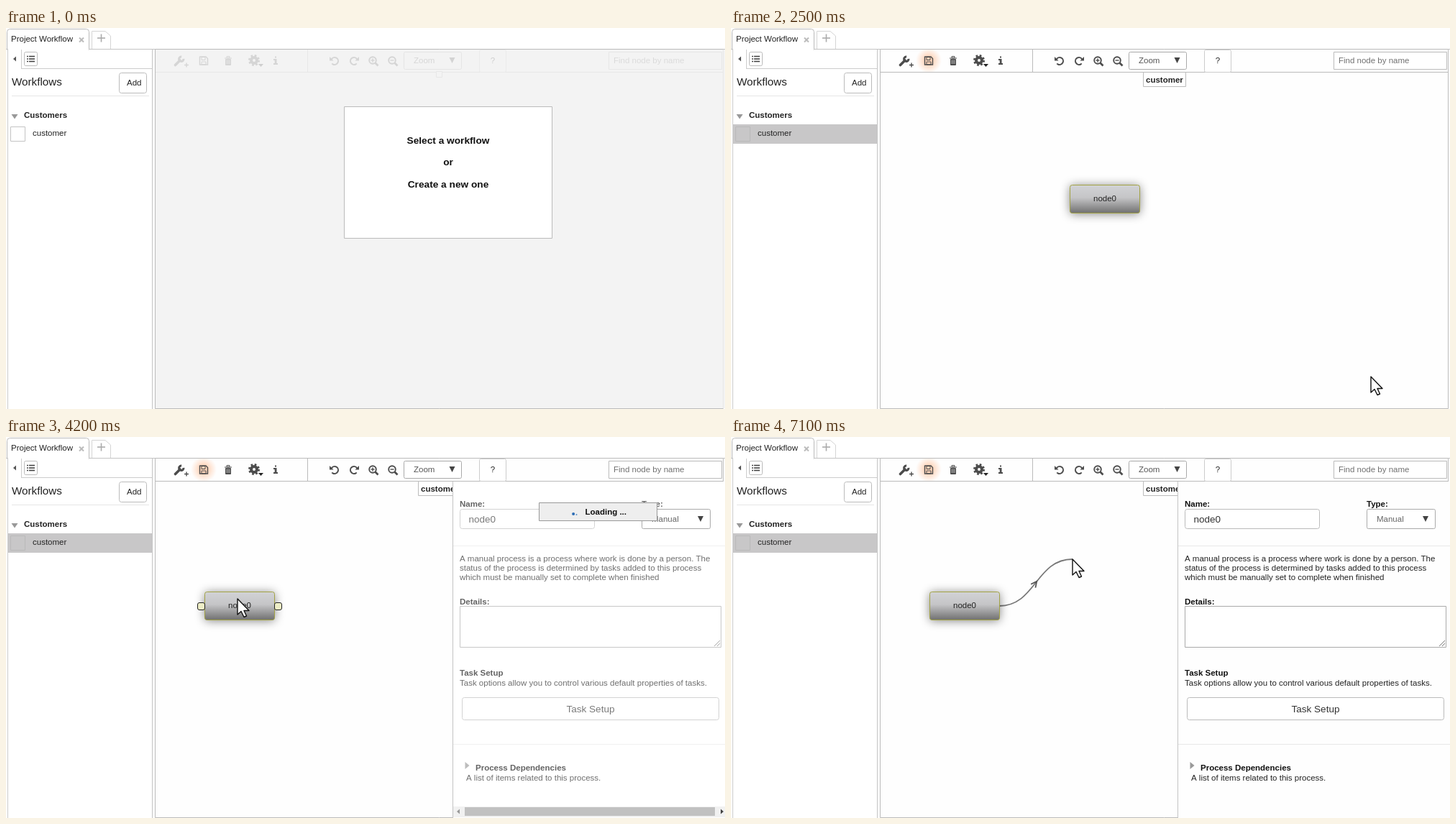
These frames come from a looping animation (1000x530 px, 7200 ms). An HTML page with a canvas:

```html
<!DOCTYPE html>
<html lang="en">
<head>
<meta charset="utf-8">
<title>Workflow editor</title>
<style>
html, body { margin: 0; width: 100%; height: 100%; overflow: hidden; background: #fff; }
canvas { display: block; width: 1000px; height: 530px; }
</style>
</head>
<body>
<canvas id="stage" width="1000" height="530"></canvas>
<script>
const c = document.getElementById('stage').getContext('2d');
const LOOP = 7200, STEP = 100, INK = '#4c4c4c';

// Cursor positions: time, x, y
const CURSOR_KEYS = [
  [100, 648, 360], [800, 117, 153], [1700, 117, 153], [2000, 890, 485],
  [2500, 890, 485], [2800, 520, 240], [3200, 517, 228], [3300, 517, 228],
  [3900, 322, 225], [4900, 322, 225], [5200, 390, 237], [6000, 390, 237], [6500, 475, 170]
];
const HAND = new Path2D('M-2 17V1.5Q0-1.5 2 1.5V9Q5 7 6.5 10Q9 8 10.5 11Q13 9.5 13.5 13V20L11 25V29H-2V26L-10 17Q-9 12-5 15Z');
const ARROW = new Path2D('M0 0V22L5 17.5L9 25.5L12.5 24L9 16.5H16Z');

function text(s, x, y, { size = 11.5, bold = false, color = '#222', align = 'left' } = {}) {
  c.font = `${bold ? 'bold ' : ''}${size}px "Liberation Sans", Arial, sans-serif`;
  c.fillStyle = color;
  c.textAlign = align;
  c.fillText(s, x, y);
}
function rect(x, y, w, h, fill, stroke, r = 0) {
  c.beginPath();
  c.roundRect(x + .5, y + .5, w, h, r);
  if (fill) { c.fillStyle = fill; c.fill(); }
  if (stroke) { c.strokeStyle = stroke; c.lineWidth = 1; c.stroke(); }
}
function line(points, color = '#bbb', width = 1) {
  c.beginPath();
  points.forEach(([x, y]) => c.lineTo(x, y));
  c.strokeStyle = color;
  c.lineWidth = width;
  c.stroke();
}
const hline = (x1, x2, y, color) => line([[x1, y + .5], [x2, y + .5]], color);
const vline = (x, y1, y2, color) => line([[x + .5, y1], [x + .5, y2]], color);
function poly(points, color) {
  c.beginPath();
  points.forEach(([x, y]) => c.lineTo(x, y));
  c.fillStyle = color;
  c.fill();
}
function circle(x, y, r, color) {
  c.beginPath();
  c.arc(x, y, r, 0, 7);
  c.fillStyle = color;
  c.fill();
}
function arc(x, y, r, from, to, width) {
  c.beginPath();
  c.arc(x, y, r, from, to);
  c.strokeStyle = INK;
  c.lineWidth = width;
  c.stroke();
}
function at(x, y, draw, sx = 1, sy = sx) {
  c.save();
  c.translate(x, y);
  c.scale(sx, sy);
  draw();
  c.restore();
}
const down = (x, y, color = '#444') => poly([[x - 4, y - 3], [x + 4, y - 3], [x, y + 5]], color);

function wrench() {
  c.lineCap = 'round';
  line([[-5.5, 5.5], [1, -1]], INK, 3.6);
  c.lineCap = 'butt';
  arc(2.8, -2.8, 3.2, -.1, -1.47, 3);
}
function save() {
  line([[-5.5, -5.5], [3, -5.5], [5.5, -3], [5.5, 5.5], [-5.5, 5.5], [-5.5, -6]], INK, 1.4);
  rect(-3.5, -5.5, 5, 4, null, INK);
  rect(-3.5, 1, 6, 4, null, INK);
}
function trash() {
  rect(-5.5, -4.5, 10, 1, INK);
  rect(-2.5, -6.5, 4, 2, null, INK);
  rect(-4.5, -3, 8, 9, INK, null, 1);
  for (const x of [-2, 0, 2]) line([[x, -1], [x, 4.5]], '#ccc', .8);
}
function gear() {
  arc(0, 0, 4, 0, 7, 4);
  c.setLineDash([2.55, 2.55]);
  arc(0, 0, 6.5, 0, 6.28, 3);
  c.setLineDash([]);
}
function info() {
  rect(-1.5, -6, 2, 2, INK);
  poly([[-3, -2], [1.5, -2], [1.5, 4], [3, 4], [3, 6], [-3, 6], [-3, 4], [-1.3, 4], [-1.3, 0], [-3, 0]], INK);
}
function undo() {
  arc(0, 0, 5, -2.6, 2.4, 2);
  poly([[-7, -6], [-7, -.5], [-1.5, -.5]], INK);
}
function magnifier(plus) {
  arc(-1, -1, 4.8, 0, 7, 1.9);
  line([[2.5, 2.5], [6.5, 6.5]], INK, 2.6);
  line([[-3.5, -1], [1.5, -1]], INK, 1.4);
  if (plus) line([[-1, -3.5], [-1, 1.5]], INK, 1.4);
}

function tabsAndSidebar(t) {
  hline(0, 1000, 29, '#c4c4c4');
  rect(1, 1, 114, 32, '#fff', '#bbb', 4);
  rect(0, 30, 206, 500, '#fff');
  text('Project Workflow', 7, 19);
  line([[102, 13.5], [108, 19.5]], '#bbb', 2);
  line([[108, 13.5], [102, 19.5]], '#bbb', 2);
  line([[119.5, 29], [119.5, 4.5], [138, 4.5], [145.5, 11], [145.5, 29]], '#d5d5d5');
  line([[127, 14], [138, 14]], '#aaa', 1.6);
  line([[132.5, 8.5], [132.5, 19.5]], '#aaa', 1.6);

  vline(2, 29, 530, '#ccc');
  vline(203, 29, 530, '#c4c4c4');
  vline(21, 30, 57, '#ccc');
  hline(21, 203, 56, '#ccc');
  poly([[14, 39.5], [14, 46.5], [10, 43]], '#555');
  rect(25, 33, 18, 19, '#fff', '#bbb', 2);
  for (const y of [39.5, 43, 46.5]) {
    line([[29, y], [31, y]], '#444', 1.6);
    line([[32, y], [40, y]], '#444', 1.6);
  }
  text('Workflows', 8, 80, { size: 15.2 });
  rect(157, 62, 38, 28, '#fff', '#bbb', 3);
  text('Add', 168, 80);
  hline(8, 199, 94, '#e6e6e6');
  poly([[7.5, 120], [16.5, 120], [12, 126.5]], '#999');
  text('Customers', 25, 125, { bold: true });

  const row = t < 800 ? null : t < 1700 ? '#e4e4e4' : '#c8c7c8';
  if (row) { c.fillStyle = row; c.fillRect(3, 134, 200, 27); }
  rect(6, 137, 20, 20, row || '#fff', row ? '#b9b9b9' : '#c4c4c4');
  text('customer', 37, 150);
}

function toolbar(edited) {
  rect(207, 29, 790, 500, '#fefefe', '#bbb');
  hline(208, 998, 61, '#bbb');
  vline(419, 30, 61, '#bbb');
  if (edited) {
    const glow = c.createRadialGradient(275, 45, 5, 275, 45, 18);
    glow.addColorStop(0, 'rgba(255,185,140,.6)');
    glow.addColorStop(1, 'rgba(255,190,150,0)');
    c.fillStyle = glow;
    c.fillRect(257, 30, 36, 31);
  }
  at(241, 46, wrench);
  line([[248, 51.5], [254, 51.5]], INK, 1.4);
  line([[251, 48.5], [251, 54.5]], INK, 1.4);
  at(275, 45.5, save);
  at(309, 45.5, trash);
  at(345, 45, gear);
  poly([[351, 50], [358, 50], [354.5, 54]], '#222');
  at(375, 45, info);
  at(457, 46, undo);
  at(484, 46, undo, -1, 1);
  at(511, 46, () => magnifier(true));
  at(538, 46, () => magnifier(false));
  rect(553, 33, 80, 24, '#fff', '#aaa', 2);
  text('Zoom', 567, 49, { color: '#555' });
  down(620.5, 44);
  rect(658, 30, 37, 31, '#fff', '#ccc', 2);
  text('?', 677, 48.5, { align: 'center' });
  rect(838, 33, 157, 24, '#fff', '#bbb');
  text('Find node by name', 845, 48.5, { color: '#707070' });
}

function welcome() {
  rect(598, 60, 8, 8, '#fff', '#bbb');
  c.fillStyle = 'rgba(241,241,241,.83)';
  c.fillRect(208, 30, 792, 499);
  rect(470, 109, 289, 183, '#fff', '#bbb');
  const style = { size: 13.7, bold: true, color: '#111', align: 'center' };
  text('Select a workflow', 615, 160.5, style);
  text('or', 615, 191, style);
  text('Create a new one', 615, 221.5, style);
}

function hint() {
  rect(819, 433, 178, 96, '#fff', '#bbb', [4, 0, 0, 0]);
  const style = { size: 13.4, color: '#666' };
  text('Click here to add your first', 838, 472, style);
  text('node. Use the', 846, 487, style);
  at(939, 483, wrench, .9);
  text('to add', 949, 487, style);
  text('more nodes.', 916, 502, { ...style, align: 'center' });
}

function node(x, y, ports, hot) {
  c.save();
  c.shadowColor = 'rgba(0,0,0,.5)';
  c.shadowBlur = 14;
  c.shadowOffsetY = 1;
  const shade = c.createLinearGradient(0, y, 0, y + 40);
  shade.addColorStop(0, '#d2d3d6');
  shade.addColorStop(.45, '#c5c5c7');
  shade.addColorStop(1, '#6e6e6e');
  rect(x, y, 97, 39, shade, null, 3);
  c.restore();
  rect(x, y, 97, 39, null, '#a3a344', 3);
  text('node0', x + 49, y + 23, { align: 'center' });
  if (ports) {
    rect(x - 10, y + 15, 10, 10, '#eeeec6', '#222', 2.5);
    rect(x + 97, y + 15, 10, 10, hot ? '#e6da7c' : '#eeeec6', '#222', 2.5);
  }
}

function edge(x0, y0, x1, y1) {
  const mx = (x0 + x1) / 2, my = (y0 + y1) / 2;
  c.beginPath();
  c.moveTo(x0, y0);
  c.bezierCurveTo(mx, y0, mx, y1, x1, y1);
  c.strokeStyle = '#777';
  c.lineWidth = 1.8;
  c.stroke();
  c.save();
  c.translate(mx, my);
  c.rotate(Math.atan2(2 * (y1 - y0), x1 - x0));
  line([[-6, -4], [2, 0], [-6, 4]], '#555', 1.8);
  c.restore();
}

function panel(t, loading) {
  c.fillStyle = '#fefefe';
  c.fillRect(621, 62, 379, 468);
  vline(621, 62, 530, '#c4c4c4');
  const bold = { bold: true, color: '#111' }, big = { size: 13.5, color: '#333' };
  text('Name:', 631, 96.5, bold);
  rect(631, 100, 187, 27, '#fff', '#bbb', 3);
  text('node0', 643.5, 118.5, big);
  text('Type:', 884, 96.5, bold);
  hline(622, 1000, 151, '#e8e8e8');
  ['A manual process is a process where work is done by a person. The',
   'status of the process is determined by tasks added to this process',
   'which must be manually set to complete when finished'
  ].forEach((s, i) => text(s, 631, 173 + 13 * i));
  text('Details:', 631, 232.5, bold);
  rect(631, 235, 363, 57, '#fff', '#aaa');
  line([[985, 291], [993, 283]], '#777');
  line([[989, 291], [993, 287]], '#777');
  text('Task Setup', 631, 332, bold);
  text('Task options allow you to control various default properties of tasks.', 631, 345.5);
  rect(634, 362, 357, 31, '#fff', '#bbb', 3);
  text('Task Setup', 813, 382.5, { ...big, align: 'center' });
  hline(622, 1000, 427, '#e8e8e8');
  poly([[638.5, 452], [644.5, 457], [638.5, 462]], '#999');
  text('Process Dependencies', 653, 464, bold);
  text('A list of items related to this process.', 640, 477.5);

  if (loading) {
    c.fillStyle = 'rgba(255,255,255,.35)';
    c.fillRect(622, 63, 378, 467);
  }
  rect(884, 100, 95, 27, '#fff', '#aaa', 2);
  text('Manual', 898, 118, { color: '#666' });
  down(966, 113);
  if (!loading) return;

  c.fillStyle = '#f1f1f1';
  c.fillRect(622, 514, 378, 15);
  c.fillStyle = '#c1c1c1';
  c.fillRect(638, 515, 348, 12);
  poly([[631, 517.5], [631, 524.5], [627, 521]], '#999');
  poly([[994, 517.5], [994, 524.5], [998, 521]], '#444');
  rect(741, 91, 164, 25, '#eee', '#999');
  const turn = 2 + (t - 4200) / 800 * Math.PI * 2;
  circle(791 + 4.5 * Math.cos(turn), 103 + 4.5 * Math.sin(turn), 2, '#2b6cb5');
  circle(791 + 5.5 * Math.cos(turn - .9), 103 + 5.5 * Math.sin(turn - .9), 1, '#5b8fc4');
  text('Loading ...', 805.5, 107.5, bold);
}

function cursorAt(t) {
  const next = CURSOR_KEYS.findIndex(k => k[0] > t);
  if (next < 0) return CURSOR_KEYS.at(-1).slice(1);
  const a = CURSOR_KEYS[Math.max(0, next - 1)], b = CURSOR_KEYS[next];
  const u = a === b ? 0 : (t - a[0]) / (b[0] - a[0]), e = u * u * (3 - 2 * u);
  return [a[1] + (b[1] - a[1]) * e, a[2] + (b[2] - a[2]) * e];
}

function drawCursor(t, x, y) {
  if (t >= 3000 && t < 3200) {
    line([[520, 238], [520, 259]], '#fff', 2);
    line([[513, 259], [527, 259]], '#fff', 2);
    line([[516, 238], [524, 238]], '#fff', 1.5);
    return;
  }
  const hand = t >= 800 && t < 1700 || t >= 5100 && t < 6000;
  at(x, y, () => {
    const shape = hand ? HAND : ARROW;
    c.fillStyle = '#fff';
    c.fill(shape);
    c.strokeStyle = '#111';
    c.lineWidth = 1.4;
    c.lineJoin = 'round';
    c.stroke(shape);
    if (hand) for (const fx of [2, 6.5, 10.5]) line([[fx, 9.5], [fx, 14]], '#111', 1.2);
  });
}

function draw(t) {
  const [x, y] = cursorAt(t);
  const hasNode = t >= 2100;
  c.fillStyle = '#fff';
  c.fillRect(0, 0, 1000, 530);
  tabsAndSidebar(t);
  toolbar(hasNode);
  if (t < 1400) welcome();
  else {
    rect(573, 61, 59, 20, '#fff', '#bbb');
    text('customer', 577, 75.5, { bold: true });
    if (!hasNode) hint();
  }
  if (hasNode) {
    const drag = t < 3300 ? 0 : (517 - Math.max(322, Math.min(517, x))) / 195;
    const moved = t >= 3900 ? 1 : drag;
    const nx = 471 - 195 * moved, ny = 218 - 3 * moved;
    if (t >= 6000) edge(nx + 97, ny + 20, x, y);
    node(nx, ny, t >= 2800 && t < 6000, t >= 5100);
  }
  if (t >= 2900) panel(t, t >= 4100 && t < 4800);
  if (t >= 100) drawCursor(t, x, y);
}

const start = performance.now();
function tick() {
  const t = (performance.now() - start) % LOOP;
  draw(Math.floor(t / STEP) * STEP);
  requestAnimationFrame(tick);
}
tick();
</script>
</body>
</html>
```
